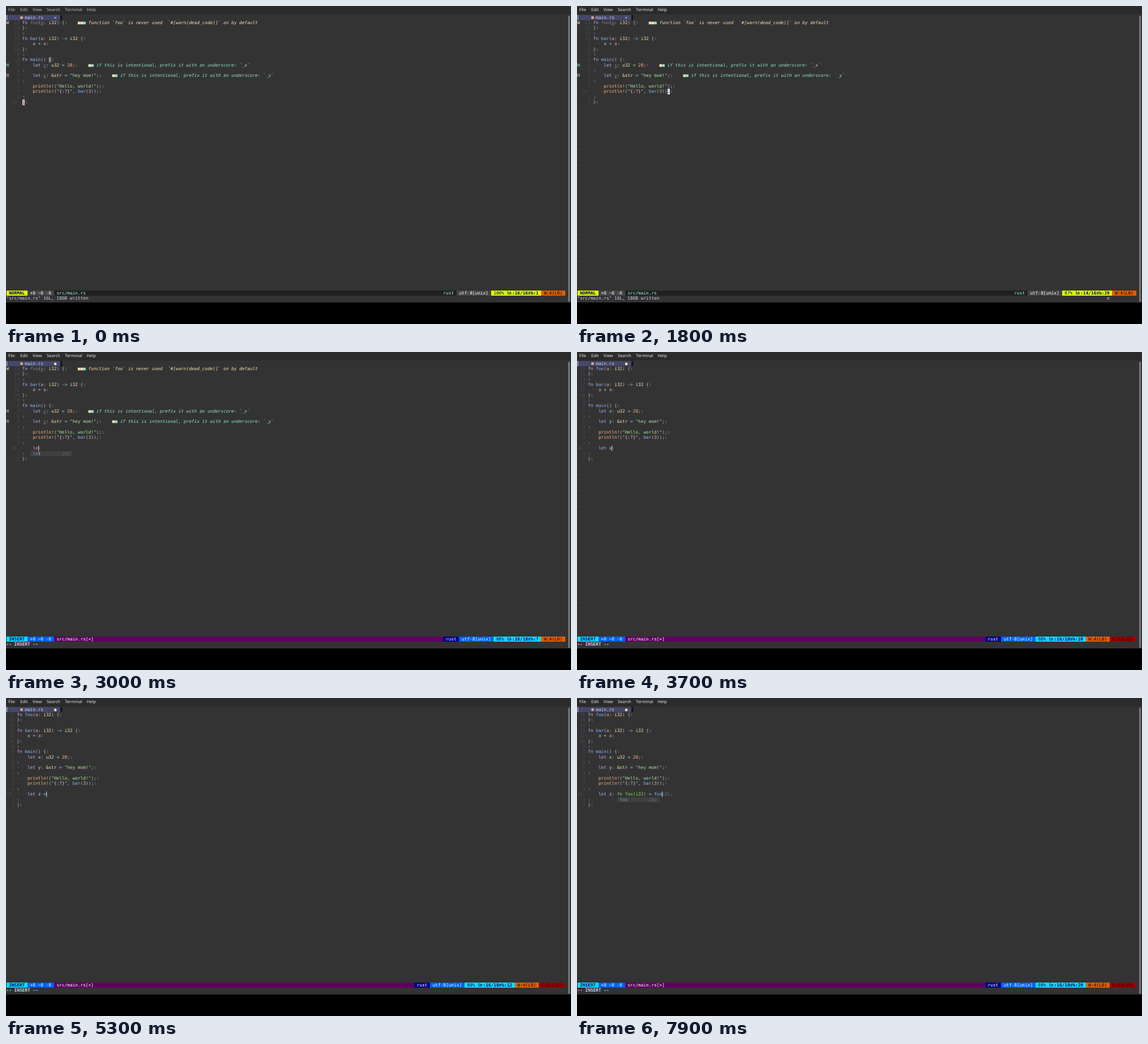
Recreate the animation shown at these times as an HTML page. Size 998 by 561 pixels, loop 8 s.

```html
<!DOCTYPE html>
<html lang="en">
<head>
<meta charset="utf-8">
<title>Editor session</title>
<style>
html, body { margin: 0; width: 998px; height: 561px; overflow: hidden; background: #000; }
#stage { position: relative; width: 998px; height: 561px; overflow: hidden; text-rendering: geometricPrecision; }
#stage * { position: absolute; }
#term { left: 0; top: 0; width: 998px; height: 523px; background: #333; }
#menu { left: 0; top: 0; width: 998px; height: 15px; background: #2b2b2b; font: 7.5px/15px "Noto Sans", "Open Sans", sans-serif; }
#bar { left: 993px; top: 17px; width: 3px; height: 505px; border-radius: 2px; background: #777; }
#grid { left: .5px; top: 15.5px; font: 7.77px/9.356px "DejaVu Sans Mono", monospace; }
#grid span { white-space: pre; height: 9.356px; box-sizing: border-box; }
</style>
</head>
<body>
<div id="stage">
  <div id="term"></div>
  <div id="menu"></div>
  <div id="bar"></div>
  <div id="grid"></div>
</div>
<script>
const CW = 4.678, RH = 9.356, COLS = 211, LOOP = 8000;
const menu = document.getElementById('menu'), grid = document.getElementById('grid');

const C = {
  text: '#cdd6f4', faint: '#484a57', eol: '#6c7086', mauve: '#cba6f7', blue: '#89b4fa', yellow: '#f9e2af',
  green: '#a6e3a1', peach: '#fab387', teal: '#94e2d5', sky: '#89dceb', red: '#f38ba8', maroon: '#eba0ac',
  pink: '#f5c2e7', punct: '#b4bad0', lime: '#85e35c', match: '#4fa3c4'
};

const code = [
  'fn foo(a: i32) {', '}', '', 'fn bar(a: i32) -> i32 {', '    a + a', '}', '', 'fn main() {',
  '    let x: u32 = 28;', '', '    let y: &str = "hey mom!";', '',
  '    println!("Hello, world!");', '    println!("{:?}", bar(3));'
];

const hint = v => `if this is intentional, prefix it with an underscore: \`_${v}\``;
const notes = {
  0: ['W', C.yellow, 3, 'function `foo` is never used  `#[warn(dead_code)]` on by default'],
  8: ['H', C.teal, 2, hint('x')],
  10: ['H', C.teal, 2, hint('y')]
};

const pum = (col, hit, rest = '') => ({ col, hit, rest });

// Each step changes part of the editor state.
const steps = [
  [0, { focus: false, insert: false, line: 16, col: 1, added: 0, typed: '', signs: true, errors: 0, menu: null, ghost: '', keys: '' }],
  [600, { focus: true }],
  [1400, { line: 15 }],
  [1500, { line: 14 }],
  [1700, { col: 29 }],
  [1800, { keys: 'o' }],
  [1900, { keys: '', insert: true, added: 1, line: 15 }],
  [2000, { added: 2, line: 16 }],
  [2800, { typed: 'l' }],
  [2900, { typed: 'le' }],
  [3000, { menu: pum(9, 'le', 't') }],
  [3200, { typed: 'let', menu: pum(9, 'let') }],
  [3300, { typed: 'let ', menu: null }],
  [3400, { typed: 'let x' }],
  [3500, { signs: false, errors: 1 }],
  [4400, { typed: 'let ' }],
  [4600, { typed: 'let z' }],
  [4800, { errors: 2 }],
  [5000, { typed: 'let z ' }],
  [5300, { typed: 'let z =' }],
  [5400, { typed: 'let z = ' }],
  [5500, { typed: 'let z = f' }],
  [5600, { menu: pum(15, 'f', 'oo') }],
  [6100, { ghost: 'oo(3);', errors: 1 }],
  [6500, { typed: 'let z = fo', ghost: 'o(3);', menu: pum(15, 'fo', 'o') }],
  [7900, { typed: 'let z: fn foo(i32) = foo', ghost: '(3);', menu: pum(15, 'foo') }]
];

let nodes;
function put(row, col, text, color, css = '') {
  const s = document.createElement('span');
  s.textContent = text;
  s.style.cssText = `left:${col * CW}px;top:${row * RH}px;color:${color};${css}`;
  nodes.push(s);
}
const box = (row, col, n, bg, css = '') => put(row, col, '', '', `width:${n * CW}px;background:${bg};${css}`);

const TOKEN = /fn foo\(i32\)|\{:\?\}|"[^"{]+"|"|println!|&?\w+|->|[+=]|\s+|./g;
function tokenColor(tok, next) {
  if (tok === 'fn foo(i32)') return C.lime;
  if (tok === '{:?}') return C.pink;
  if (tok[0] === '"') return C.green;
  if (/^(fn|let)$/.test(tok)) return C.mauve;
  if (/^(i32|u32|&str)$/.test(tok)) return C.yellow;
  if (/^(println!|\d+)$/.test(tok)) return C.peach;
  if (/^(->|\+|=)$/.test(tok)) return C.sky;
  if (tok === 'a') return C.maroon;
  if (/^(l|le|f|fo)$/.test(tok)) return C.red;
  if (tok === 'foo' || /^\w/.test(tok) && next === '(') return C.blue;
  return /\w/.test(tok) ? C.text : C.punct;
}

function drawCode(row, left, text, unused) {
  for (const { 0: tok, index } of text.matchAll(TOKEN)) {
    const col = left + index;
    if (tok[0] === ' ') put(row, col, '·'.repeat(tok.length), C.faint);
    else if (unused && /^(foo|a|x|y)$/.test(tok))
      put(row, col, tok, '#7d7f8c', tok === 'foo' ? 'font-style:italic' : 'text-decoration:underline');
    else put(row, col, tok, tokenColor(tok, text[index + tok.length]));
  }
}

function drawTab(s) {
  box(0, 0, 20.5, '#45476a');
  box(0, 0, .3, C.text);
  box(0, 20.5, .5, '#11111b');
  put(0, 5.2, '', '', 'width:5px;height:5px;margin-top:2.2px;border-radius:50%;background:#dea584');
  put(0, 7, 'main.rs', C.text);
  s.insert ? put(0, 18, '●', C.yellow) : put(0, 18, '✕', C.text);
}

function drawStatus(s, total) {
  const t = s.insert
    ? { a: '#00dfff', b: '#005fff', c: '#5f005f', x: '#000080', fg: '#fff' }
    : { a: '#dfff00', b: '#444', c: '#202020', x: '#202020', fg: '#9cffd3' };
  const navy = '#00005f', row = 52;
  const seg = (col, text, bg, fg, css) => {
    box(row, col, text.length, bg);
    put(row, col, text, fg, css);
  };
  box(row, 0, COLS, t.c);
  seg(0, s.insert ? ' INSERT ' : ' NORMAL ', t.a, navy, 'font-weight:bold');
  seg(8, ' +0 ~0 -0 ', t.b, '#fff');
  put(row, 19, 'src/main.rs' + (s.insert ? '[+]' : ''), t.fg);

  let end = COLS;
  const right = (text, bg, fg) => seg(end -= text.length, text, bg, fg);
  if (s.errors) right(` E:${s.errors}(L15) `, '#900', '#000');
  right(' W:4(L0) ', '#df5f00', '#000');
  const pct = ` ${Math.floor(s.line / total * 100)}% `, lines = `:${s.line}/${total}`;
  const at = ':' + s.col;
  end -= pct.length + lines.length + at.length + 5;
  box(row, end, pct.length + lines.length + at.length + 5, t.a);
  put(row, end, pct, navy);
  let col = end + pct.length;
  for (const [text, n] of [['㏑', 2], [lines, lines.length], ['≡', 1], ['℅', 1], [at, 0]]) {
    put(row, col, text, navy, 'font-weight:bold');
    col += n;
  }
  right(' utf-8[unix] ', t.b, '#fff');
  right(' rust ', t.x, t.fg);
}

function drawCursor(s, left, lines) {
  const row = s.line, col = left + s.col - 1;
  if (s.insert) return box(row, col, .2, '#d0d0d0');
  const ch = lines[row - 1][s.col - 1] || ' ';
  if (row === 16) {
    box(8, left + 10, 1, '#585b70');
    put(8, left + 10, '{', C.peach, 'font-weight:bold');
  }
  if (s.focus) {
    box(row, col, 1, '#e4e6f0');
    put(row, col, ch, '#333');
  } else {
    box(row, col, 1, '#585b70', 'border:.8px solid #f0d8d0');
    put(row, col, ch, C.peach, 'font-weight:bold');
  }
}

function draw(s) {
  nodes = [];
  const left = s.signs ? 6 : 4, indent = '    ';
  const added = [[], [indent], ['', indent + s.typed]][s.added];
  const lines = [...code, ...added, '', '}'];
  if (s.added === 2) s.col = 5 + s.typed.length;
  else if (s.added === 1) s.col = 5;

  drawTab(s);
  lines.forEach((text, i) => {
    const row = i + 1, here = row === s.line, note = s.signs && notes[i];
    const num = here ? String(row) : String(Math.abs(row - s.line)).padStart(3);
    put(row, left - 4, num, C.faint);
    drawCode(row, left, text, note);
    let end = left + text.length;
    if (here && s.ghost) put(row, end, s.ghost, '#7c7f8c');
    else put(row, end, '↴', C.eol);
    if (note) {
      const [sign, color, n, msg] = note;
      put(row, 0, sign, color);
      end += 5;
      put(row, end, '■'.repeat(n - 1), C.yellow);
      put(row, end + n - 1, '■', C.teal);
      put(row, end + n + 1, msg, color, 'font-style:italic');
    }
  });
  for (let row = lines.length + 1; row < 52; row++) put(row, 0, '~', C.faint);

  if (s.menu) {
    const { col, hit, rest } = s.menu, row = s.line + 1;
    box(row, col, 16, '#3f3f40');
    put(row, col + 1, hit, C.match);
    put(row, col + 1 + hit.length, rest, C.text);
    put(row, col + 12, '[A]', '#686b78', 'font-style:italic');
  }
  drawCursor(s, left, lines);
  drawStatus(s, lines.length);
  if (s.insert) put(53, 0, '-- INSERT --', C.text, 'font-weight:bold');
  else put(53, 0, '"src/main.rs" 16L, 186B written', C.text);
  put(53, 200, s.keys, C.text);
  grid.replaceChildren(...nodes);
  menu.style.color = s.focus ? '#e4e4e4' : '#b8b8b8';
}

[['File', 4], ['Edit', 25], ['View', 47], ['Search', 72], ['Terminal', 104], ['Help', 142.5]].forEach(([name, x]) => {
  const item = document.createElement('span');
  item.textContent = name;
  item.style.left = x + 'px';
  menu.append(item);
});

let shown = -1;
function tick() {
  const t = performance.now() % LOOP;
  const last = steps.findLastIndex(([at]) => at <= t);
  if (last !== shown) {
    shown = last;
    draw(Object.assign({}, ...steps.slice(0, last + 1).map(step => step[1])));
  }
  requestAnimationFrame(tick);
}
tick();
</script>
</body>
</html>
```
